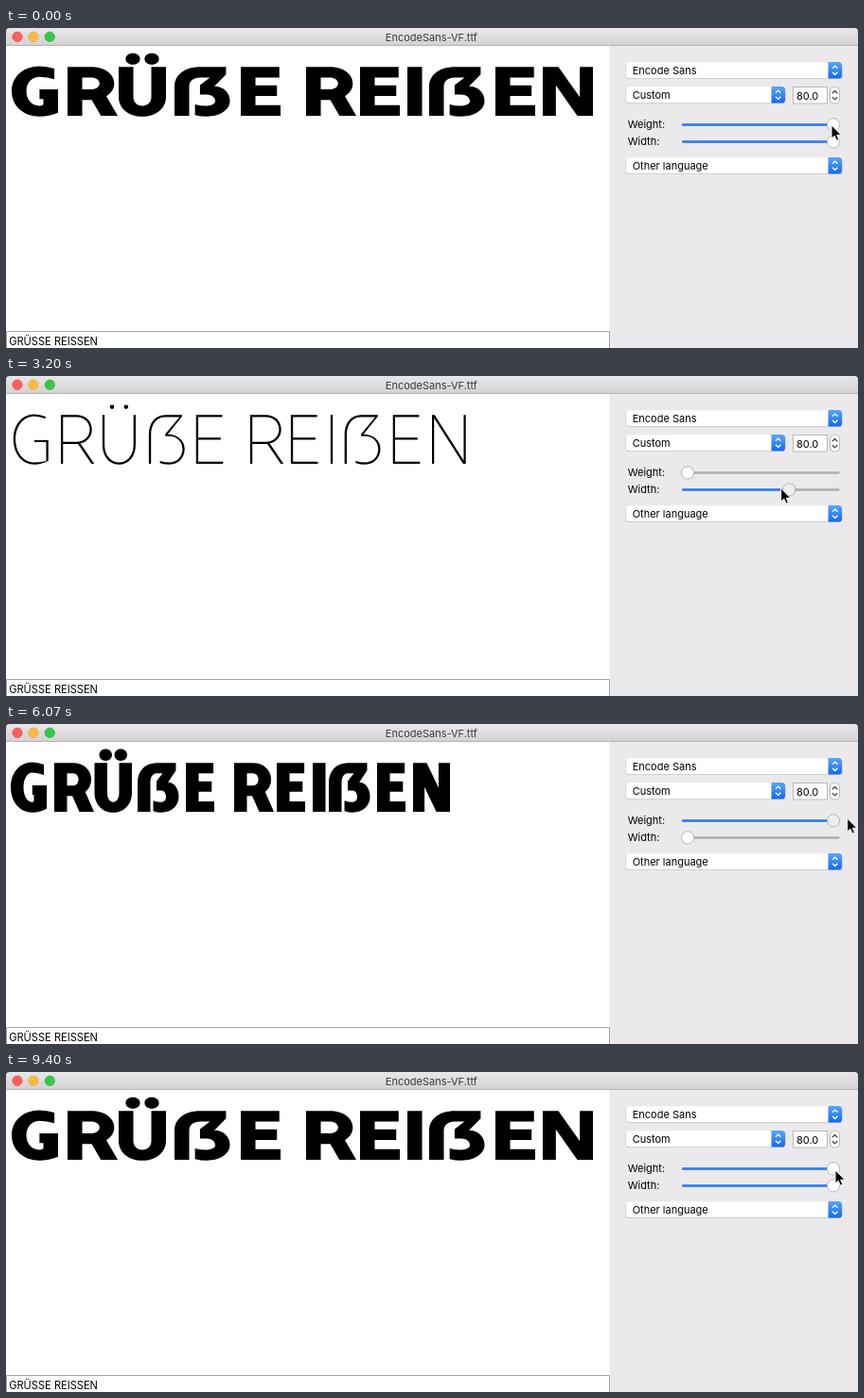
An HTML page for the animation above (9.47 s loop, 900x339 px).

```html
<!DOCTYPE html>
<html lang="en">
<head>
<meta charset="utf-8">
<title>EncodeSans-VF.ttf</title>
<style>
html, body { margin: 0; width: 100%; height: 100%; overflow: hidden; background: #fff; }
svg { display: block; width: 900px; height: 339px; }
text { font: 11px Inter, "Open Sans", sans-serif; fill: #000; }
</style>
</head>
<body>
<svg id="stage" viewBox="0 0 900 339">
  <defs>
    <linearGradient id="bar" x2="0" y2="1">
      <stop stop-color="#e9e7e9"/><stop offset="1" stop-color="#d3d1d3"/>
    </linearGradient>
    <linearGradient id="blue" x2="0" y2="1">
      <stop stop-color="#5aa6fb"/><stop offset="1" stop-color="#1268f2"/>
    </linearGradient>
  </defs>
  <rect width="900" height="339" fill="#fff"/>
  <rect x="637.5" y="18" width="262.5" height="321" fill="#ebe9eb"/>
  <rect width="900" height="18.5" fill="url(#bar)"/>
  <rect y="18" width="900" height="1" fill="#b5b3b5"/>
  <path d="M0 0H4Q0 0 0 4ZM900 0H896Q900 0 900 4Z" fill="#555"/>
  <g stroke-width=".6">
    <circle cx="12" cy="9.3" r="5.2" fill="#fc605b" stroke="#df4744"/>
    <circle cx="29" cy="9.3" r="5.2" fill="#fdbc40" stroke="#de9f34"/>
    <circle cx="46.3" cy="9.3" r="5.2" fill="#34c84a" stroke="#27aa35"/>
  </g>
  <text x="449.3" y="13.6" text-anchor="middle" style="fill:#3c3a3c">EncodeSans-VF.ttf</text>
  <path d="M.5 339V321.5H637.5V339" fill="#fff" stroke="#a3a3a3"/>
  <text x="3.2" y="335.6" style="font-size:11.1px">GRÜSSE REISSEN</text>
  <g id="panel"></g>
  <path id="word" role="img" aria-label="GRÜẞE REIẞEN"/>
  <path id="cursor" d="M0 0V14.2L3.2 11.2L5.4 16.2L7.8 15.2L5.7 10.3H10.2Z"
    fill="#000" stroke="#fff" stroke-width="1" stroke-linejoin="round"/>
</svg>
<script>
const $ = id => document.getElementById(id);
const LOOP = 9470, TOP = 41.2, BASE = 93, MIN_X = 720, RANGE = 154;

// ---- side panel ----
const chevrons = (x, y, color) =>
  `<path d="M${x - 2.7} ${y - 2}l2.7-2.7l2.7 2.7M${x - 2.7} ${y + 2}l2.7 2.7l2.7-2.7"
    fill="none" stroke="${color}" stroke-width="1.3"/>`;

function popup(y, right, label) {
  const w = right - 655, x = right - 14.5;
  return `<rect x="654.5" y="${y + .8}" width="${w + 1}" height="17.2" rx="3.6" fill="#c3c1c3"/>
    <rect x="655" y="${y + .3}" width="${w}" height="17" rx="3.3" fill="#fff"/>
    <path d="M${x} ${y}h11q3.5 0 3.5 3.5v10.6q0 3.5-3.5 3.5h-11z" fill="url(#blue)"/>
    ${chevrons(x + 7.2, y + 8.8, '#fff')}
    <text x="661.7" y="${y + 13}">${label}</text>`;
}

const slider = (id, y, label) =>
  `<text x="656.7" y="${y + 3.5}">${label}</text>
  <rect x="714" y="${y - .8}" width="166.5" height="2.6" rx="1.3" fill="#afadaf"/>
  <rect id="${id}Fill" x="714" y="${y - .8}" height="2.6" rx="1.3" fill="#2a7ef3"/>
  <circle id="${id}Knob" cy="${y + .4}" r="6.6" stroke="#a9a7a9" stroke-width=".8"/>`;

$('panel').innerHTML = popup(36, 883, 'Encode Sans') + popup(62, 823, 'Custom') +
  `<rect x="831.5" y="62.5" width="36" height="17.5" fill="#fff" stroke="#b9b7b9"/>
  <text x="835" y="76">80.0</text>
  <rect x="870.5" y="62.5" width="10" height="17.5" rx="4" fill="#fff" stroke="#b9b7b9"/>` +
  chevrons(875.5, 71.2, '#444') +
  slider('weight', 102, 'Weight:') + slider('width', 120, 'Width:') +
  popup(137, 883, 'Other language');

// ---- lettering: every value is given for bold wide, bold narrow, thin wide, thin narrow ----
const LINE = [
  ['G', 6, 5, 8.6, 6], ['R', 65, 51, 62.3, 48], ['U', 119, 93.5, 109.3, 84.7],
  ['S', 178, 139, 161.7, 126], ['E', 248, 190, 215, 168], ['R', 317, 241, 277, 214],
  ['E', 374, 286, 323, 250], ['I', 424, 324, 368, 285], ['S', 447, 341, 384, 297],
  ['E', 517, 392, 439, 339], ['N', 567, 430, 483, 374]
];
const SIZE = {
  G: [49, 38, 39.5, 31], R: [53, 42, 38, 29], U: [50, 39.5, 38, 28.5],
  S: [58.5, 43.5, 41, 30.5], E: [42, 30, 31, 23], I: [15.5, 13.5, 2.3, 2.3], N: [53, 39, 38.6, 29]
};
const lerp = (a, b, k) => a + (b - a) * k;

// path writer shifted to the left edge of a letter
function pen(x0) {
  let d = '';
  const p = (x, y) => `${(x0 + x).toFixed(2)} ${y.toFixed(2)}`;
  let cx = 0, cy = 0;
  const me = {
    m(x, y) { d += 'M' + p(x, y); cx = x; cy = y; return me; },
    l(...a) { for (let i = 0; i < a.length; i += 2) { d += 'L' + p(a[i], a[i + 1]); cx = a[i]; cy = a[i + 1]; } return me; },
    // quarter curve; first leaves vertically (v) or horizontally (h)
    q(dir, x, y, k = .58) {
      const h = dir === 'h';
      d += 'C' + p(h ? lerp(cx, x, k) : cx, h ? cy : lerp(cy, y, k)) + ' ' +
        p(h ? x : lerp(x, cx, k), h ? lerp(y, cy, k) : y) + ' ' + p(x, y);
      cx = x; cy = y; return me;
    },
    // shallow curve, level at height flat
    s(x, y, flat) {
      d += 'Q' + p((cx + x) / 2, flat) + ' ' + p(x, y);
      cx = x; cy = y; return me;
    },
    z() { d += 'Z'; return me; },
    dot(x, y, rx, ry) {
      return me.m(x - rx, y).q('v', x, y - ry).q('h', x + rx, y).q('v', x, y + ry).q('h', x - rx, y).z();
    },
    get d() { return d; }
  };
  return me;
}

const GLYPH = {
  I: (g, w) => g.m(0, BASE).l(0, TOP, w, TOP, w, BASE).z(),
  E(g, w, s, h) {
    const m = 66.3 - h / 2;
    g.m(0, BASE).l(0, TOP, w * .97, TOP, w * .97, TOP + h, s, TOP + h, s, m, w * .91, m,
      w * .91, m + h, s, m + h, s, BASE - h, w, BASE - h, w, BASE).z();
  },
  N(g, w, stem) {
    const s = stem * .88 + .2, d = stem * 1.04 + .4, run = (BASE - TOP) * (w - s - d) / (w - d);
    g.m(0, BASE).l(0, TOP, d, TOP, w - s, TOP + run, w - s, TOP, w, TOP, w, BASE,
      w - d, BASE, s, BASE - run, s, BASE).z();
  },
  U(g, w, s, h, mix) {
    const y = 73, low = BASE + .8, c = w / 2, gap = mix([20, 16, 15.6, 13]) / 2;
    g.m(0, TOP).l(0, y).q('v', c, low).q('h', w, y).l(w, TOP, w - s, TOP, w - s, y)
      .q('v', c, low - h).q('h', s, y).l(s, TOP).z();
    const rx = mix([7.6, 6.7, 2.2, 2.2]), ry = mix([6, 6.2, 2.2, 2.2]);
    g.dot(c - gap, 32.7, rx, ry).dot(c + gap, 32.7, rx, ry);
  },
  G(g, w, s, h, mix) {
    const hi = TOP - .7, lo = BASE + .7, c = w * .6, bar = mix([65, 65, 68, 68]);
    const bx = Math.min(w * .6, w - s), rx = w * .92;
    g.m(rx, hi + 2.5).s(c, hi, hi).q('h', 0, 67).q('v', c, lo)
      .s(w, BASE - 3.2, lo).l(w, bar, bx, bar, bx, bar + h * .9, w - s, bar + h * .9, w - s, BASE - h - .8)
      .s(c, lo - h, lo - h).q('h', s, 67).q('v', c, hi + h).s(rx, hi + 2.5 + h, hi + h).z();
  },
  R(g, w, s, h, mix) {
    const low = mix([76.3, 76.3, 72, 72]), c = w * .47, r = w * .93, mid = (TOP + low) / 2;
    const leg = s * 1.12 + .4, a = w * mix([.36, .34, .47, .47]);
    g.m(0, BASE).l(0, TOP, s, TOP, s, BASE).z();
    g.m(0, TOP).l(c, TOP).q('h', r, mid).q('v', c, low).l(0, low).z();
    const ic = Math.max(c, s + 1);
    g.m(s, TOP + h).l(s, low - h, ic, low - h).q('h', r - s, mid).q('v', ic, TOP + h).z();
    g.m(a, low - h).l(a + leg, low - h, w, BASE, w - leg, BASE).z();
  },
  S(g, w, s, h, mix) {
    const c = w * .46, r = w * .93, lo = BASE + .7, bc = w * .58, bend = 62;
    const tx = w * mix([.37, .38, .31, .31]), xl = w * .46;
    const xi = r - mix([17, 14, 2.8, 2.8]);
    const y1 = mix([60.5, 60.5, 61.5, 61.5]), y2 = mix([70.5, 70.5, 63.8, 63.8]);
    const xn = mix([.72 * w, .74 * w, .46 * w + 2.6, .46 * w + 2.6]);
    const cut = TOP + mix([8, 8, 1.6, 1.6]);
    g.m(0, BASE).l(0, bend).q('v', c, TOP, .6).l(r, TOP, r, cut, xn, 61.7)
      .q('h', w, 77.3).q('v', bc, lo).s(tx, BASE - .8, lo)
      .l(tx, BASE - .8 - h).s(bc, lo - h, lo - h).q('h', w - s, 77.6)
      .q('v', Math.min(bc, w - s - 2), y2).l(xl, y2, xl, y1, xi, TOP + h, Math.min(c, xi), TOP + h)
      .q('h', s, bend, .6).l(s, BASE).z();
  }
};

function lettering(weight, width) {
  const mix = q => lerp(lerp(q[3], q[2], width), lerp(q[1], q[0], width), weight);
  const s = mix([15.5, 13.5, 2.3, 2.3]), h = mix([11.3, 11, 2.2, 2.2]);
  return LINE.map(([ch, ...x]) => {
    const g = pen(mix(x));
    GLYPH[ch](g, mix(SIZE[ch]), s, h, mix);
    return g.d;
  }).join('');
}

// ---- pointer path: time, x, y ----
const PATH = [
  [0, 872, 103], [260, 872, 103], [2080, 713, 94], [2650, 874, 119], [4050, 712, 119],
  [4250, 712, 119], [4550, 716, 101], [5950, 872, 100], [6090, 890, 100], [6200, 890, 100],
  [6750, 719, 119], [6900, 719, 119], [8150, 879, 117.5], [8500, 879, 118],
  [9300, 876, 104], [9400, 876, 104], [LOOP, 872, 103]
];
function pointer(t) {
  t = (t + LOOP) % LOOP;
  const i = PATH.findIndex(k => k[0] > t), a = PATH[i - 1], b = PATH[i];
  const p = (t - a[0]) / (b[0] - a[0]), k = p * p * (3 - 2 * p);
  return [lerp(a[1], b[1], k), lerp(a[2], b[2], k)];
}
const within = (t, a, b) => t >= a && t < b;

function setSlider(id, v, held) {
  const x = MIN_X + RANGE * v;
  $(id + 'Knob').setAttribute('cx', x);
  $(id + 'Knob').setAttribute('fill', held ? '#efedef' : '#fff');
  $(id + 'Fill').setAttribute('width', v > 0 ? x - 714 : 0);
}

function draw(t) {
  const [x, y] = pointer(t);
  // knobs trail the pointer a little
  const drag = Math.min(1, Math.max(0, (pointer(t - 45)[0] - MIN_X) / 152));
  const weight = t < 2130 || within(t, 4550, 6200) ? drag : t < 4550 ? 0 : 1;
  const width = within(t, 2700, 4250) || within(t, 6900, 8250) ? drag : within(t, 4250, 6900) ? 0 : 1;
  setSlider('weight', weight, within(t, 230, 2150) || within(t, 4500, 6150));
  setSlider('width', width, within(t, 2620, 4260) || within(t, 6850, 8300));
  $('word').setAttribute('d', lettering(weight, width));
  $('cursor').setAttribute('transform', `translate(${x.toFixed(2)} ${y.toFixed(2)})`);
}

function tick() {
  const t = performance.now() % LOOP;
  draw(Math.floor((t + 5) * .015) / .015 % LOOP);
  requestAnimationFrame(tick);
}
tick();
</script>
</body>
</html>
```
